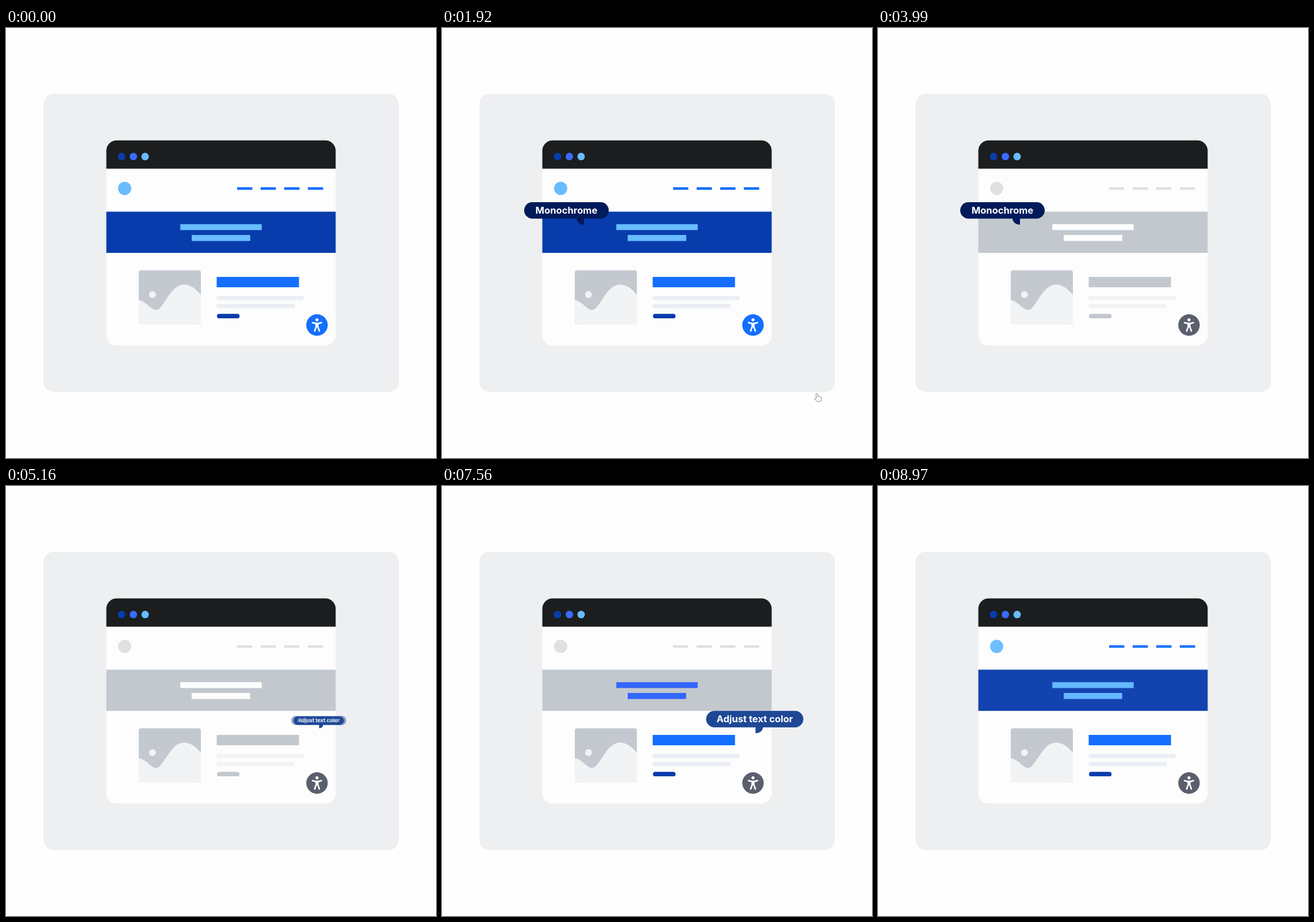
An HTML page that plays this animation: 748 by 748 pixels, repeating every 9000 ms.

```html
<!DOCTYPE html>
<html lang="en">
<head>
<meta charset="utf-8">
<title>Accessible page demo</title>
<style>
  html, body { margin: 0; width: 100%; height: 100%; overflow: hidden; background: #fefefe; }
  svg { position: absolute; left: 0; top: 0; display: block; }
  text { font: 700 16.6px Inter, "Open Sans", sans-serif; fill: #fff; text-anchor: middle; }

  /* Colours: --a start, --b monochrome, --c adjusted, --d end of loop */
  .tint { fill: var(--a); animation: tint 9s linear infinite; }
  @keyframes tint {
    0%, 24.67% { fill: var(--a); }
    30.67%, 65% { fill: var(--b); }
    71%, 93.8% { fill: var(--c); }
    100% { fill: var(--d); }
  }
  .logo { --a: #68bcff; --b: #e0e0e0; --c: #e0e0e0; --d: #68bcff; }
  .nav { --a: #146eff; --b: #e0e0e0; --c: #e0e0e0; --d: #146eff; }
  .band { --a: #083cac; --b: #c2c8ce; --c: #c2c8ce; --d: #083cac; }
  .hero { --a: #68bcff; --b: #fefefe; --c: #3366ff; --d: #68bcff; }
  .head { --a: #146eff; --b: #c2c8ce; --c: #146eff; --d: #146eff; }
  .para { --a: #ebeff3; --b: #f2f3f4; --c: #ebeff3; --d: #ebeff3; }
  .pill { --a: #083cac; --b: #c2c8ce; --c: #083cac; --d: #083cac; }
  .badge { --a: #146eff; --b: #5b5f6d; --c: #5b5f6d; --d: #5b5f6d; }

  /* Bubbles scale about their centre; a half-opaque copy runs ahead as blur */
  .mono { transform-origin: 216.5px 322.5px; animation: mono 9s 15ms infinite both; }
  .adjust { transform-origin: 544px 411px; animation: adjust 9s 15ms infinite both; }
  .ghost { opacity: .5; animation-delay: -15ms; }
  @keyframes mono {
    0%, 51%, 100% { transform: scale(0); }
    10.67% { transform: scale(0); animation-timing-function: cubic-bezier(.33, .733, .67, 1); }
    20.67% { transform: scale(1); }
    44% { transform: scale(1); animation-timing-function: cubic-bezier(.33, 0, .67, .267); }
  }
  @keyframes adjust {
    0%, 93.67%, 100% { transform: scale(0); }
    54.33% { transform: scale(0); animation-timing-function: cubic-bezier(.33, .733, .67, 1); }
    64.33% { transform: scale(1); }
    83.67% { transform: scale(1); animation-timing-function: cubic-bezier(.33, 0, .67, .267); }
  }

  .cursor {
    overflow: visible;
    offset-path: path("M538 521Q648 521 648 659");
    offset-rotate: 0deg;
    offset-anchor: 0 0;
    animation: travel 9s infinite, show 9s linear infinite;
  }
  @keyframes travel {
    0% { offset-distance: 100%; animation-timing-function: cubic-bezier(.45, 0, .55, 1); }
    6.67% { offset-distance: 0%; }
    12% { offset-distance: 0%; animation-timing-function: cubic-bezier(.45, 0, .55, 1); }
    24.44%, 100% { offset-distance: 100%; }
  }
  @keyframes show {
    0% { opacity: 0; }
    .4%, 23.8% { opacity: 1; }
    24.5%, 100% { opacity: 0; }
  }
</style>
</head>
<body>
<svg width="748" height="748" viewBox="0 0 748 748">
  <defs>
    <clipPath id="window"><rect x="174.5" y="195.5" width="399" height="357" rx="18"/></clipPath>
    <clipPath id="photo"><rect x="231" y="421.5" width="108" height="94.5" rx="4"/></clipPath>
    <g id="mono">
      <path d="M234 330q.5 11.5 13 12V330z" fill="#001a5a"/>
      <rect x="143" y="303" width="147" height="28.5" rx="14.25" fill="#001a5a"/>
      <text x="216.5" y="323.3">Monochrome</text>
    </g>
    <g id="adjust">
      <path d="M558.5 418q-.5 11.5-13 12V418z" fill="#1f4896"/>
      <rect x="459.5" y="391.2" width="169" height="28.5" rx="14.25" fill="#1f4896"/>
      <text x="544" y="411.5">Adjust text color</text>
    </g>
  </defs>

  <rect x="65" y="114.5" width="618.5" height="518.7" rx="18" fill="#edeff1"/>

  <g clip-path="url(#window)">
    <rect x="174" y="195" width="400" height="358" fill="#fdfdfd"/>
    <rect x="174" y="195" width="400" height="49.7" fill="#1b1d1e"/>
    <rect class="tint band" x="174" y="319.5" width="400" height="71.7"/>
  </g>
  <circle cx="201" cy="223.6" r="6.5" fill="#083cac"/>
  <circle cx="221.6" cy="223.6" r="6.5" fill="#3a6bff"/>
  <circle cx="242" cy="223.6" r="6.5" fill="#68bcff"/>

  <circle class="tint logo" cx="206.4" cy="279.1" r="11.5"/>
  <path class="tint nav" d="M402 277h26.5v4.4H402zM443 277h26.5v4.4H443zM484 277h26.5v4.4H484zM525 277h26.7v4.4H525z"/>
  <path class="tint hero" d="M303.2 341.2h141.6v10.4H303.2zM323 360h101.8v10.4H323z"/>

  <g clip-path="url(#photo)">
    <rect x="231" y="421" width="108" height="95" fill="#c3c9cf"/>
    <path d="M231 473.5C244 475 252 490.5 261 490.5C275 490 285 446.3 310 446.3C322 446.3 332 456 339 464V516H231z" fill="#f1f3f5"/>
    <circle cx="254.8" cy="463.7" r="6" fill="#f1f3f5"/>
  </g>

  <rect class="tint head" x="366.5" y="433" width="143.2" height="18"/>
  <path class="tint para" d="M366.5 466h151v7.5h-151zM366.5 480h135.5v7.5H366.5z"/>
  <rect class="tint pill" x="367" y="497.3" width="39.3" height="7.8" rx="3.9"/>

  <circle class="tint badge" cx="541" cy="516.7" r="18.7"/>
  <g fill="none" stroke="#fff" stroke-width="2.7" stroke-linecap="round" stroke-linejoin="round">
    <path d="M533.2 512.6Q541 515.8 548.8 512.6M539.6 515V519.5L536.9 527M542.4 515V519.5L545.1 527M541 515.5V519"/>
    <circle cx="541" cy="507.7" r="2.7" fill="#fff" stroke="none"/>
  </g>

  <use class="mono" href="#mono"/>
  <use class="mono ghost" href="#mono"/>
  <use class="adjust" href="#adjust"/>
  <use class="adjust ghost" href="#adjust"/>
</svg>
<svg class="cursor" width="13" height="16" viewBox="0 0 13 16">
  <path transform="rotate(-8 6 8)" d="M4.2 8.6V2a1.5 1.5 0 0 1 3 0V6.3l4 .8q1.6.4 1.5 2l-.5 3.2q-.4 3-3.4 3H7q-1.6 0-2.6-1.4L1.2 10.4q-.6-1 .4-1.5 1-.4 1.8.5z" fill="#fff" stroke="#555" stroke-width=".7" stroke-linejoin="round"/>
</svg>
</body>
</html>
```
